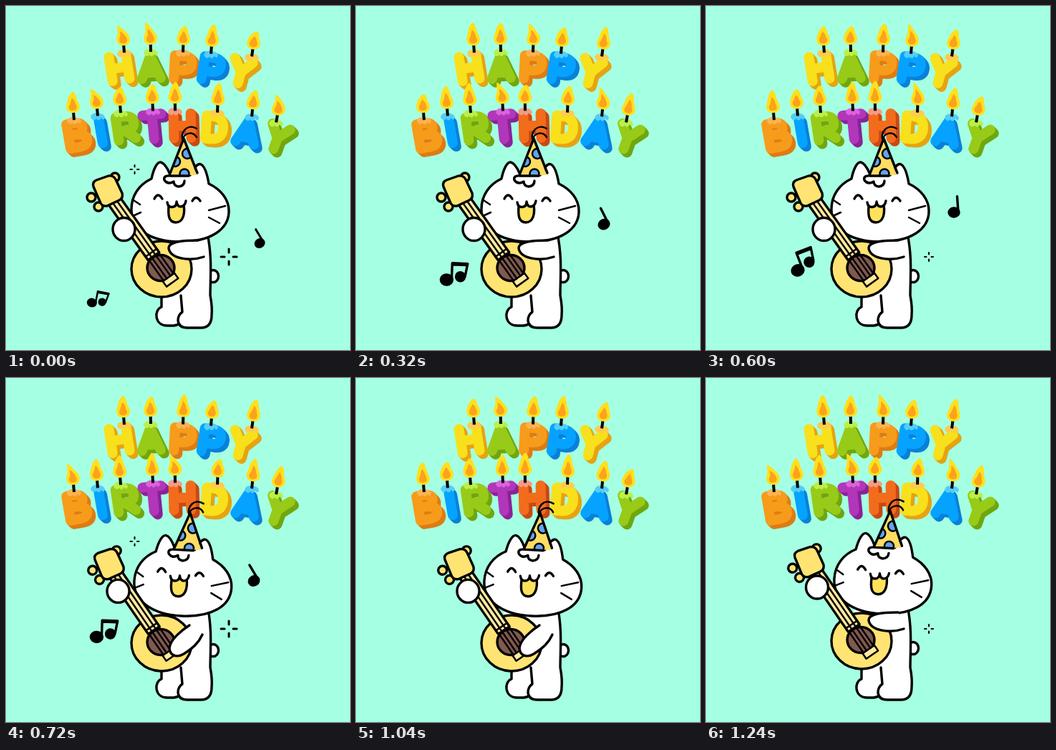
An HTML page for the animation above (1280 ms loop, 480 by 480 pixels).

```html
<!DOCTYPE html>
<html lang="en">
<head>
<meta charset="utf-8">
<title>Happy birthday</title>
<style>
html, body { margin: 0; width: 100%; height: 100%; overflow: hidden; background: #a5ffe2; }
svg { display: block; width: 100vw; height: 100vh; }
.ink { fill: none; stroke: #000; stroke-width: 3.4; stroke-linecap: round; stroke-linejoin: round; }
.white { fill: #fff; }
.gold { fill: #ffe473; }
.pale { fill: #ffeaa0; }
.blue { fill: #62a4ee; }
.thin { stroke-width: 2.5; }
.letter { fill: none; stroke-width: 14; stroke-linecap: round; stroke-linejoin: round; }
</style>
</head>
<body>
<svg viewBox="0 0 480 480" role="img" aria-label="Happy birthday">
  <g id="letters"></g>
  <g id="candles"></g>

  <g class="ink">
    <ellipse id="tail" class="white" cx="289" cy="377" rx="7.5" ry="8.5"/>
    <path class="white" d="M217 395V420C206 424 207 446 225 446H234Q245 445 246 434L248 395"/>
    <path class="white" stroke="none" d="M244 404L246 427Q240 431 240 439Q241 449 253 449H272Q287 449 287 431C284 412 288 380 281 318H206L212 395Z"/>
    <path d="M281 318C288 350 285 380 285 404Q288 420 287 431Q287 449 272 449H253Q241 449 240 439Q240 431 246 427L244 404"/>

    <g id="head">
      <path class="white" d="M203 241C206 227 211 217 216 218C221 219 226 228 229 235L257 236C262 226 268 219 272 221C278 224 281 236 283 248C300 256 311 270 311 286C311 312 285 329 243 329C200 329 175 310 175 284C175 264 186 249 203 241Z"/>
      <path class="thin" d="M247 188C242 178 252 163 266 171M247 187C247 178 260 173 266 183"/>
      <clipPath id="cone"><path d="M248 185L228 236H266Z"/></clipPath>
      <path d="M248 185L228 236H266Z" fill="#ffdc62" stroke="none"/>
      <g class="blue thin" clip-path="url(#cone)">
        <circle cx="236" cy="217" r="7"/>
        <circle cx="253" cy="206" r="7"/>
        <circle cx="249" cy="234" r="6.5"/>
        <circle cx="270" cy="226" r="6"/>
      </g>
      <path d="M228 236L248 185L267 233"/>
      <path class="white" d="M255 237H230Q219 236 221 243Q226 250 234 245Q234 251 241 252Q249 251 249 244"/>
      <path d="M207 269Q212 259 218 269M260 272Q265 263 271 272"/>
      <path d="M227 279C226 292 227 302 237 302C247 302 250 290 248 278" fill="#ffe25c"/>
      <path class="white" d="M225 274Q226 281 232 280.5Q238 280 238 273Q239 280 244 280Q250 279 251 272"/>
      <path class="thin" d="M178 271L187 277M177 293L188 288M283 285L306 279M283 295L298 303"/>
    </g>

    <g id="banjo">
      <ellipse class="gold" cx="217" cy="367" rx="42" ry="39"/>
      <ellipse cx="216" cy="365.5" rx="19" ry="18" fill="#80594f"/>
      <g class="pale" transform="translate(141 258) rotate(54.5)">
        <path d="M12-9.5H112V9.5H12Z"/>
        <path class="thin" d="M106-9V9M148-10H157V10H148Z"/>
        <path class="thin" d="M12-3.2H148M12 3.2H148M112-8.5H148M112 8.5H148"/>
      </g>
      <g class="gold">
        <circle cx="152" cy="239" r="6"/>
        <circle cx="119" cy="267" r="6"/>
        <circle cx="129" cy="280" r="6"/>
        <path d="M122 252Q120 246 126 243L143 237Q150 236 153 242L162 261Q164 268 158 271L141 279Q135 280 132 275Z"/>
      </g>
    </g>
    <ellipse id="hand" class="white" rx="15.5" ry="16"/>
    <path id="armUp" class="white" d="M268 327C250 327 227 328 227 338C229 352 255 357 276 350"/>
    <path id="armDown" class="white" d="M256 345C245 352 229 365 228 377C229 389 240 390 248 385C262 376 269 369 274 358"/>

    <path id="sparkL"/>
    <path id="sparkR"/>
    <g id="single">
      <ellipse rx="7" ry="6" fill="#000"/>
      <path d="M6-1V-22"/>
    </g>
    <g id="pair">
      <ellipse cx="-9.5" cy="2.5" rx="8" ry="7" fill="#000"/>
      <circle cx="9.5" cy="-2.5" r="6" fill="#000"/>
      <path d="M-2.5 1V-21H19L16-3M-1.5-19H18"/>
    </g>
  </g>
</svg>
<script>
const LOOP = 1280, STEP = 40, FLICKER = 480, SWING = 360, NOTE_LIFE = 960;
const $ = id => document.getElementById(id);
const set = (id, attrs) => {
  for (const k in attrs) $(id).setAttribute(k, attrs[k]);
};
const show = (id, on) => set(id, { visibility: on ? 'visible' : 'hidden' });

const P = 'M-11-16V16M-11-16H1Q13-16 13-6T1 4H-11';
const glyphs = {
  H: 'M-12-17V17M12-17V17M-12 0H12',
  A: 'M-13 16L0-15L13 16M-8 8H8',
  P,
  Y: 'M-13-16L0 1L13-16M0 1V17',
  B: 'M-12-17V17M-12-17H0Q11-16 9-8T-3-1H-12M-3-1Q14 0 13 9Q12 17 0 17H-12',
  I: 'M0-17V17',
  R: P + 'M0 4L13 16',
  T: 'M-13-16H13M0-16V18',
  D: 'M-11-16V16H-2Q13 15 13 0T-2-16Z'
};

// face, side, wax
const paint = {
  yellow: ['#f8e01c', '#e6a312', '#ffcb50'],
  green: ['#98ca18', '#70a60f', '#b9f04a'],
  orange: ['#f79b1b', '#dd7c14', '#fbb454'],
  blue: ['#05a3ff', '#0a80d8', '#55cdf6'],
  purple: ['#b136ba', '#8b2299', '#dd62dc'],
  red: ['#f26c1c', '#cb4812', '#f59a85']
};

// x places each letter, side its candle, phase starts the flicker (in steps);
// rise and turn bend the line of letters.
const lines = [
  {
    text: 'HAPPY', colours: 'yellow green orange blue yellow',
    x: [159, 203, 247, 287, 329], side: [6, -1, 0, -1, 14], phase: [1, 3, 10, 6, 0],
    rise: x => 86 + .00045 * (x - 210) ** 2, turn: i => 6 * i - 9
  },
  {
    text: 'BIRTHDAY', colours: 'orange blue green purple red yellow blue green',
    x: [100, 133, 167, 206, 247, 291, 337, 380],
    side: [-5, -5, -7, -1, -11, 4, 6, -3], phase: [8, 1, 0, 10, 7, 6, 10, 1],
    rise: x => 168 + .00075 * (x - 232) ** 2, turn: i => .7 * (i - .5) ** 2 - 10
  }
];

const word = lines.flatMap(line => [...line.text].map((ch, i) => ({
  shape: glyphs[ch], colours: paint[line.colours.split(' ')[i]],
  x: line.x[i], y: line.rise(line.x[i]), turn: line.turn(i),
  side: line.side[i], start: line.phase[i] * STEP
})));

$('letters').innerHTML = word.map(({ shape, colours, x, y, turn }) =>
  [5, 4, 3, 2, 1, 0].map(d =>
    `<path class="letter" d="${shape}" stroke="${colours[d ? 1 : 0]}"
      transform="translate(${x + d - 1} ${y + d - 1}) rotate(${turn})"/>`).join('')).join('');

$('candles').innerHTML = word.map(({ colours, x, y, turn, side }, i) =>
  `<g transform="translate(${x + side} ${y - 22})">
    <path d="M-10 2Q-9-5 0-4T10 2Q8 8 5 3Q1 9-2 4Q-6 9-10 2Z" fill="${colours[2]}"/>
    <g transform="rotate(${turn / 2})">
      <path d="M0 0V-13" stroke="#000" stroke-width="4"/>
      <path id="outer${i}" fill="#ffe01b"/><path id="inner${i}" fill="#fba31c"/>
    </g></g>`).join('');

// Each flame stretches upward, then flicks left and sinks.
function flame({ start }, i, t) {
  const u = ((t - start) / FLICKER + LOOP) % 1;
  const dx = u < .69 ? 1.5 - 2 * u : -7;
  const h = 25 + 6 * Math.sin(Math.PI * u ** 1.5);
  const top = -11 - h, tip = -11 - h * .62;
  set('outer' + i, { d: `M0-10C-9-10-11-18-8-24C-6-29-7-${h + 4} ${dx} ${top}C${dx + 5} ${top + 1} ${dx * .4 + 5} -31 7-26C12-18 9-10 0-10Z` });
  set('inner' + i, { d: `M0-13C-6-13-7-18-4-22Q-3-24 ${dx * .4 - 1} ${tip - 2}Q${dx * .3 + 3} ${tip} 4-22C7-17 5-13 0-13Z` });
}

function spark(id, x, y, size) {
  show(id, size > 0);
  const a = size > 1 ? 6 : 3.5, b = size > 1 ? 11 : 6;
  const rays = [0, 1, 2, 3].map(k => {
    const c = Math.cos(k * Math.PI / 2), s = Math.sin(k * Math.PI / 2);
    return `M${x + c * a} ${y + s * a}L${x + c * b} ${y + s * b}`;
  });
  set(id, { d: rays.join(''), 'stroke-width': size > 1 ? 3 : 2 });
}

// Notes pop to full size, drift up with an ease-out and swing like a pendulum.
function note(id, t, { x, y, drift, climb, ease, small, swing, fade }) {
  const p = Math.min(1, t / NOTE_LIFE), pop = Math.min(1, t / 160);
  const turn = -13 + swing * Math.cos(2 * Math.PI * t / SWING) * (1 - fade * p);
  const up = climb * (1 - (1 - p) ** ease);
  show(id, p < 1);
  set(id, {
    transform: `translate(${x + drift * pop} ${y - up}) rotate(${turn}) scale(${small + (1 - small) * pop})`
  });
}

const pair = { x: 127, y: 413.5, drift: 9, climb: 57, ease: 2.2, small: .73, swing: 24, fade: .5 };
const single = { x: 354, y: 331, drift: -8, climb: 53, ease: 1.7, small: .88, swing: -18, fade: 0 };

function draw(t) {
  const right = t >= LOOP / 2, half = t % (LOOP / 2);
  const down = (t + 240) % 320 < 160;
  const dy = down ? 3 : 0;

  word.forEach((letter, i) => flame(letter, i, t));
  set('head', { transform: right ? `translate(3 ${dy}) rotate(3 243 300)` : `translate(0 ${dy})` });
  set('banjo', { transform: `translate(0 ${dy}) rotate(${right ? 1 : 0} 217 367)` });
  set('tail', { transform: `translate(0 ${dy})` });
  set('hand', { cx: (right ? 155 : 164.5) + dy / 2, cy: (right ? 292 : 311.5) + dy * 1.8 });
  show('armUp', !down);
  show('armDown', down);

  spark('sparkL', 179.5, 228, half < 120 ? 1 : half < 320 ? 2 : 0);
  spark('sparkR', 311, 350, half < 120 ? 2 : half >= 560 ? 1 : 0);
  note('pair', t, pair);
  note('single', t, single);
}

const start = performance.now();
function tick() {
  const t = (performance.now() - start) % LOOP;
  draw(Math.floor(t / STEP) * STEP);
  requestAnimationFrame(tick);
}
tick();
</script>
</body>
</html>
```
